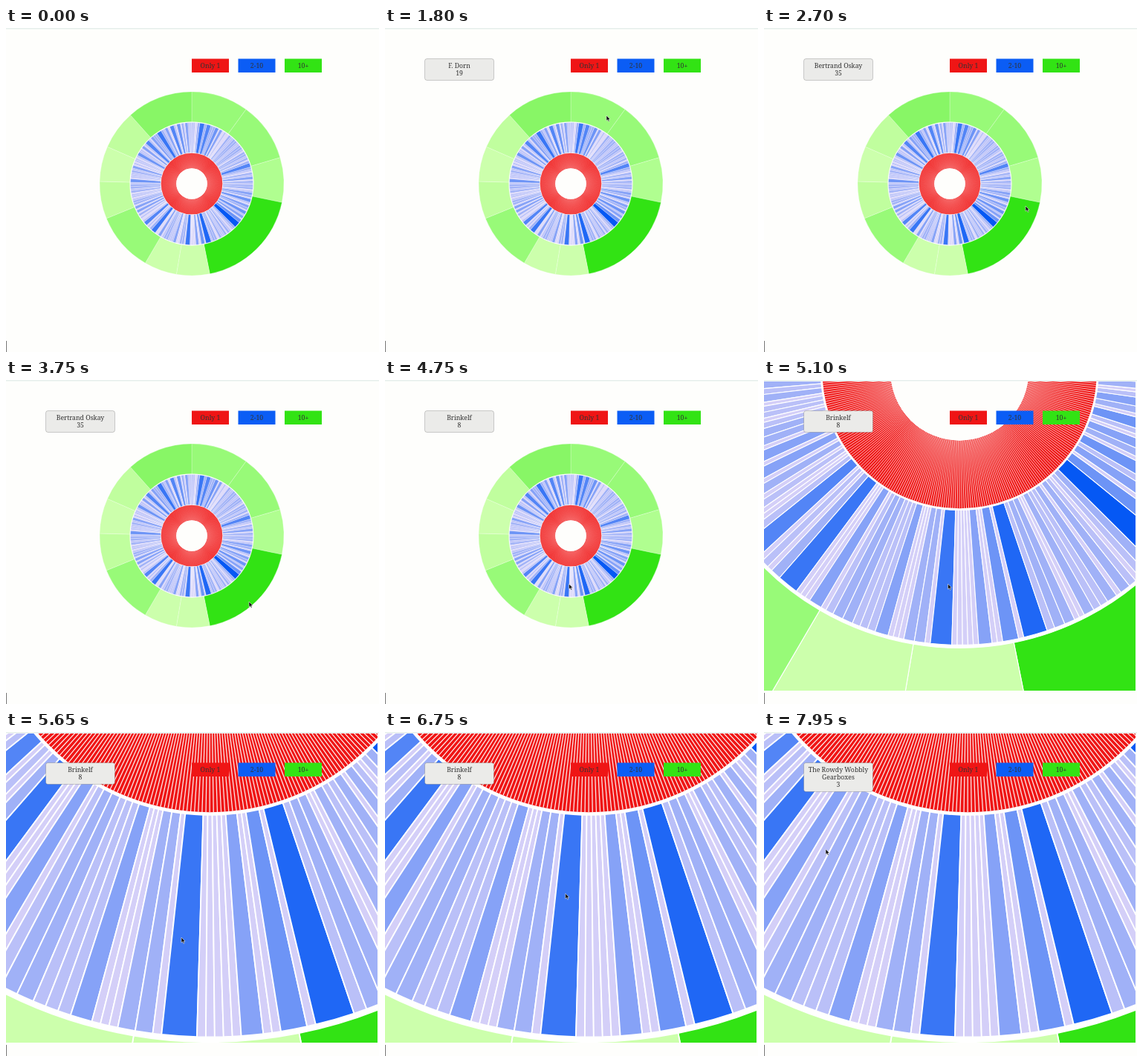
An HTML page that plays this animation: 502x437 px, repeating every 8000 ms.

```html
<!DOCTYPE html>
<html lang="en">
<head>
<meta charset="utf-8">
<title>Listening rings</title>
<style>
  html, body { margin: 0; width: 100%; height: 100%; overflow: hidden; background: #fefefc; }
  svg { display: block; }
  text { font: 8.7px "Noto Serif", "DejaVu Serif", serif; fill: #333; text-anchor: middle; }
  .tip rect { fill: #ebebe9; stroke: rgba(0, 0, 0, .18); }
</style>
</head>
<body>
<svg width="502" height="437" viewBox="0 0 502 437">
  <defs><clipPath id="view"><rect y="2" width="500" height="417"/></clipPath></defs>
  <rect width="502" height="437" fill="#fefefc"/>
  <rect width="502" height="1.5" fill="#e6efec"/>
  <g clip-path="url(#view)"><g id="chart"></g></g>
  <rect y="422" width="1" height="15" fill="#777"/>
  <g id="legend"></g>
  <g class="tip" id="tip">
    <rect x="53.5" y="41.5" width="93" rx="3"/>
    <text x="100" y="53.7"></text><text x="100" y="63.7"></text><text x="100" y="73.7"></text>
  </g>
  <path id="cursor" d="M0 0V7.2L1.7 5.7 2.9 8.3 4.1 7.8 3 5.2H5.2Z" fill="#111" stroke="#fff" stroke-width=".5"/>
</svg>
<script>
const LOOP = 8000, TICK = 50;
const CX = 250, CY = 210;
const FOCUS = [246.2, 273.8];

const $ = id => document.getElementById(id);
const add = (parent, tag, attrs, text) => {
  const el = document.createElementNS('http://www.w3.org/2000/svg', tag);
  for (const k in attrs) el.setAttribute(k, attrs[k]);
  if (text) el.textContent = text;
  return parent.appendChild(el);
};

// Clock angle in degrees, 0 at the top
const at = (r, deg) => {
  const a = deg * Math.PI / 180;
  return (CX + r * Math.sin(a)).toFixed(3) + ' ' + (CY - r * Math.cos(a)).toFixed(3);
};
const sector = (r0, r1, a, b) =>
  `M${at(r1, a)}A${r1} ${r1} 0 0 1 ${at(r1, b)}L${at(r0, b)}A${r0} ${r0} 0 0 0 ${at(r0, a)}Z`;

let seed = 7;
const random = () => (seed = seed * 16807 % 2147483647) / 2147483647;

// Splits a span into small counts of 2 to 4
function fill(span) {
  const out = [];
  while (span > 0) {
    let v = span < 5 ? span : 2 + Math.floor(random() * 3);
    if (span - v === 1) v--;
    if (span === 4 && random() < .4) v = 2;
    out.push(v);
    span -= v;
  }
  return out;
}

const OTHERS = ['Quillfrost', 'Tamsin Verlow', 'Odd Marzipan', 'Dustmoor', 'Ivo Brandle', 'Kettlewharf'];
const GREEN_NAMES = { 0: 'F. Dorn', 3: 'Bertrand Oskay' };
const BLUE_NAMES = { 11: 'The Rowdy Wobbly|Gearboxes', 24: 'Brinkelf' };
const nameOf = (special, i) => special[i] || OTHERS[i % OTHERS.length];

// End angle, count, colour
const greens = [
  [36.1, 19, '#98fa78'], [73.5, 20, '#98fa78'], [101.8, 15, '#b0fe90'], [168.7, 35, '#32e314'],
  [189.6, 11, '#ccffac'], [210.3, 11, '#ccffac'], [247.8, 20, '#98fa78'], [271.4, 13, '#c0fe9e'],
  [293.7, 11, '#ccffac'], [318.3, 13, '#c0fe9e'], [360, 22, '#88f666']
].map(([end, count, color], i, all) =>
  ({ start: i ? all[i - 1][0] : 0, end, count, color, name: nameOf(GREEN_NAMES, i) }));

// Counts run anticlockwise, starting at the lower left
const counts = [
  7, 2, 3, 2, 4, 8, 2, 2, 2, 5, 2, 3, 4, 4, 3, 3, 3, 5, 2, 2, 2, 4, 4, 2, 8,
  2, 2, 2, 2, 2, 5, 2, 2, 6, 2, 9, 3, 4, 4, 2, 2, 4, 3, 3, 4, 2, 4, 3, 2, 3, 4, 10
];
// Span of small counts, then one larger count
[[0, 6], [2, 5], [3, 6], [6, 5], [5, 6], [6, 5], [22, 5], [16, 7], [71, 5], [2, 6], [8, 7], [4, 8],
 [20, 5], [8, 6], [5, 7], [4, 5], [7, 8], [8, 5], [5, 7], [5, 5], [8, 6], [18, 5], [18, 6],
 [41, 5], [2, 5]].forEach(([span, big]) => counts.push(...fill(span), big));
counts.push(...fill(18));

const mix = (a, b, f) => Math.round(a + (b - a) * f);
const blue = n => {
  const f = (n - 2) / 8;
  return `rgb(${mix(212, 5, f)},${mix(207, 88, f)},${mix(248, 244, f)})`;
};
const unit = 360 / counts.reduce((a, b) => a + b);
let edge = 231.2;
const blues = counts.map((count, i) => {
  const end = edge;
  edge -= count * unit;
  return { start: edge, end, count, color: blue(count), name: nameOf(BLUE_NAMES, i) };
});

const chart = $('chart');
add(chart, 'circle', { cx: CX, cy: CY, r: 84, fill: '#fff' });
const drawRing = (ring, r0, r1) => ring.forEach(w =>
  add(chart, 'path', { d: sector(r0, r1, w.start, w.end), fill: w.color, stroke: '#fff', 'stroke-width': .25 }));
drawRing(greens, 83.4, 124);
drawRing(blues, 41.8, 82.5);

const SINGLES = 372;
let spokes = '';
for (let i = 0; i < SINGLES; i++) {
  const a = i * 360 / SINGLES;
  spokes += `M${at(20.8, a)}L${at(41.3, a)}`;
}
add(chart, 'circle', { cx: CX, cy: CY, r: 31.05, fill: 'none', stroke: '#ef1515', 'stroke-width': 20.5 });
add(chart, 'path', { d: spokes, stroke: '#fdeaea', 'stroke-width': .17 });
add(chart, 'circle', { cx: CX, cy: CY, r: 20.8, fill: '#fefefc' });

[['Only 1', '#ef1515'], ['2-10', '#0b5df5'], ['10+', '#32e314']].forEach(([label, color], i) => {
  const x = 250 + 62.5 * i;
  add($('legend'), 'rect', { x, y: 41.5, width: 50, height: 18.5, fill: color });
  add($('legend'), 'text', { x: x + 25, y: 53.7 }, label);
});

// Time, power of two
const zooms = [[4850, .48], [4900, .96], [4950, 1.44], [5000, 1.92], [5100, 2.16], [5200, 2.4], [5350, 2.64], [5550, 2.88]];
// Time, x, y
const path = [
  [700, 408, 57], [900, 406, 62], [1100, 394, 85], [1300, 370, 103], [1600, 318, 122], [1800, 298, 118],
  [1950, 302, 122], [2200, 330, 142], [2400, 347, 185], [2600, 354, 215], [2700, 352, 240], [3000, 336, 280],
  [3150, 335, 283], [3750, 327, 299], [3850, 327, 299], [3950, 290, 315], [4100, 266, 316], [4450, 249, 289],
  [4700, 247.5, 275], [5350, 247.5, 275], [5550, 236, 277], [5700, 236, 277], [5950, 290, 265],
  [6350, 345, 240], [6800, 230, 215], [7200, 140, 185], [7700, 100, 165], [7950, 83, 158]
];

const scaleAt = t => zooms.reduce((k, [when, p]) => t >= when ? 2 ** p : k, 1);

function cursorAt(t) {
  if (t < path[0][0]) return null;
  const i = path.findIndex(p => p[0] > t);
  if (i < 0) return path[path.length - 1].slice(1);
  const [t0, x0, y0] = path[i - 1], [t1, x1, y1] = path[i], f = (t - t0) / (t1 - t0);
  return [x0 + (x1 - x0) * f, y0 + (y1 - y0) * f];
}

function wedgeUnder([x, y], k) {
  const dx = FOCUS[0] + (x - FOCUS[0]) / k - CX, dy = FOCUS[1] + (y - FOCUS[1]) / k - CY;
  const r = Math.hypot(dx, dy);
  if (r > 124 || r < 41.5) return null;
  const a = (Math.atan2(dx, -dy) * 180 / Math.PI + 360) % 360;
  const inside = w => [a, a - 360].some(d => d >= w.start && d < w.end);
  return (r > 83 ? greens : blues).find(inside);
}

const tip = $('tip'), box = tip.querySelector('rect'), lines = tip.querySelectorAll('text');
function showTip(w) {
  tip.style.display = w ? '' : 'none';
  if (!w) return;
  const rows = [...w.name.split('|'), w.count];
  box.setAttribute('height', 9 + 10 * rows.length);
  lines.forEach((line, i) => { line.textContent = rows[i] ?? ''; });
}

const begin = performance.now();
function render() {
  const t = Math.floor((performance.now() - begin) % LOOP / TICK) * TICK;
  const k = scaleAt(t), pos = cursorAt(t);
  chart.setAttribute('transform', `translate(${FOCUS[0] * (1 - k)} ${FOCUS[1] * (1 - k)}) scale(${k})`);
  $('cursor').style.display = pos ? '' : 'none';
  if (pos) $('cursor').setAttribute('transform', `translate(${pos[0]} ${pos[1]})`);
  showTip(pos && wedgeUnder(pos, k));
  requestAnimationFrame(render);
}
render();
</script>
</body>
</html>
```
